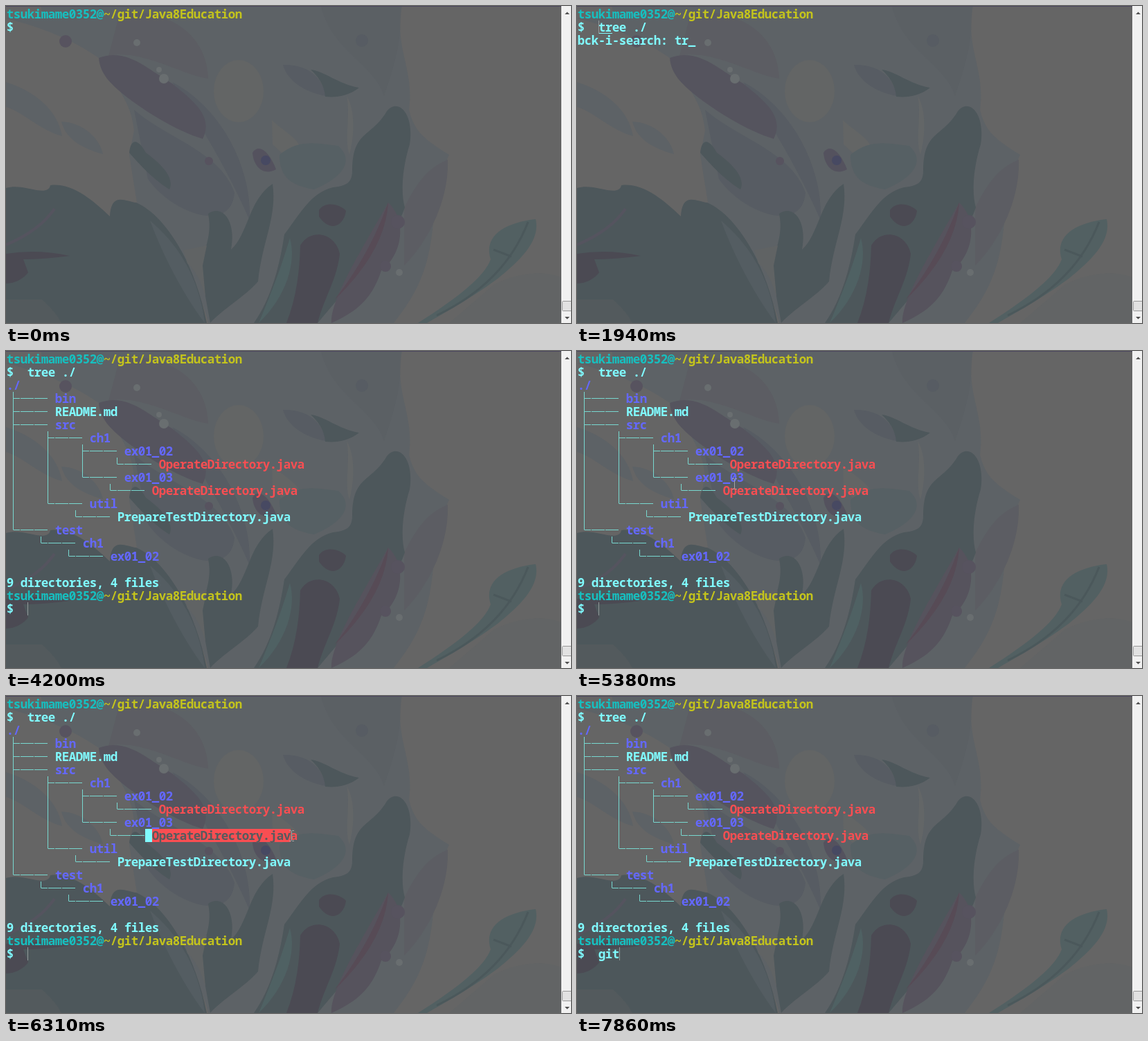
Write an HTML page that moves like this. It is 816 by 458 pixels and loops after 8 s.

```html
<!DOCTYPE html>
<html lang="en">
<head>
<meta charset="utf-8">
<title>Terminal session</title>
<style>
html, body { margin: 0; width: 100%; height: 100%; overflow: hidden; background: #656565; }
svg { display: block; width: 816px; height: 458px; }
text { font: 600 17.5px "Noto Sans Mono", "DejaVu Sans Mono", monospace; letter-spacing: -.5px; white-space: pre; }
</style>
</head>
<body>
<svg viewBox="0 0 816 458" xmlns="http://www.w3.org/2000/svg">
  <g id="wallpaper">
    <rect width="816" height="458" fill="#656565"/>
    <g fill="#5d6266">
      <path d="M0 18C50 30 100 50 138 78C150 110 180 130 185 180L178 215L190 290C230 350 280 400 292 458H560C640 360 600 300 640 215C600 190 590 180 582 150C590 90 560 60 572 0H50C60 30 20 10 0 18Z"/>
      <path d="M0 110C40 122 75 150 81 188C50 180 20 150 0 146Z"/>
      <path d="M80 167C110 168 135 190 140 214C110 206 86 192 80 167Z"/>
    </g>
    <path d="M640 458L705 402C750 380 785 385 802 392V458Z" fill="#626465"/>
    <g fill="#5c5d63">
      <path d="M165 8C235 5 290 40 292 105C250 98 195 62 148 72Z"/>
      <path d="M575 292C600 240 620 230 638 222C640 280 610 340 575 375Z"/>
    </g>
    <g fill="#575c63">
      <path d="M240 110C300 140 355 220 352 310C330 260 300 200 240 110Z"/>
      <path d="M185 150C230 190 310 210 330 270C325 330 240 300 205 250Z"/>
      <path d="M400 85C430 84 456 98 462 130C432 125 406 108 400 85Z"/>
      <path d="M455 0H570C572 60 556 98 546 130C530 82 470 65 455 0Z" opacity=".4"/>
    </g>
    <path d="M134 75C175 60 205 92 240 112C272 138 300 160 284 192C250 182 205 155 175 132C150 112 136 98 134 75Z" fill="#55545e"/>
    <ellipse cx="336" cy="123" rx="36" ry="45" fill="#636565"/>
    <path d="M384 165C400 180 420 190 425 204L398 212L385 200Z" fill="#636565"/>
    <path d="M492 130C505 150 503 190 496 215C488 190 498 160 492 130Z" fill="#636667"/>
    <g fill="#4d575b">
      <path d="M0 263C25 255 60 278 64 259C95 255 125 280 150 304C152 268 172 282 188 284C225 300 270 360 290 458H0Z"/>
      <path d="M178 212C180 192 190 190 202 212C224 228 244 248 236 265C212 250 194 230 178 212Z"/>
      <path d="M440 92C460 94 480 113 510 118C492 132 474 132 461 131C460 114 450 101 440 92Z"/>
      <path d="M283 392C278 360 300 340 292 300C312 286 333 310 325 352C350 330 350 280 385 257C392 304 370 340 364 398C345 420 310 440 295 458Z"/>
      <path d="M500 238C500 180 528 190 550 152C566 132 590 155 583 200C572 235 570 270 576 291C560 340 510 380 478 425L450 458H358C385 420 396 370 402 330C425 300 440 270 472 262C492 260 500 255 500 238Z"/>
    </g>
    <path d="M0 424H52C60 432 72 442 80 458H0Z" fill="#535a5d"/>
    <path d="M208 310C255 350 280 400 287 458C262 425 230 370 208 310Z" fill="#545d62"/>
    <path d="M256 353L290 346L284 375L288 420Q278 385 262 372Z" fill="#606364"/>
    <path d="M395 215C425 190 455 200 480 202C510 230 470 255 445 265C415 260 395 250 395 215Z" fill="#566064"/>
    <path d="M410 335C420 370 405 420 365 458C385 410 400 370 410 335Z" fill="#4f6163"/>
    <g fill="#4b4a53">
      <path d="M425 346C440 320 476 328 482 358C478 395 460 420 450 458H405C420 420 424 382 425 346Z"/>
      <path d="M452 295C462 280 485 288 491 296C488 318 468 328 452 304Z"/>
      <path d="M0 358Q45 351 92 361Q55 366 25 366L32 385Q20 400 0 401Z"/>
    </g>
    <path d="M552 284C580 310 572 360 542 382C530 420 510 440 470 458C468 425 512 355 552 284Z" fill="#56535d"/>
    <path d="M552 284Q548 354 474 425Q525 360 552 284Z" fill="#574b56"/>
    <path d="M0 345Q48 325 70 293" fill="none" stroke="#55545f" stroke-width="4"/>
    <path d="M595 458C652 422 692 390 700 366C690 335 715 314 765 308C772 338 745 366 710 394C675 420 635 442 608 458Z" fill="#526062"/>
    <path d="M622 447Q720 400 754 312M704 352L730 362" fill="none" stroke="#4b585b" stroke-width="3"/>
    <path d="M356 212C365 198 380 210 390 236C375 245 358 236 356 212Z" fill="#54525e"/>
    <circle cx="375" cy="223" r="7" fill="#474962"/>
    <g fill="#57535f">
      <circle cx="86" cy="51" r="9"/><circle cx="293" cy="224" r="6"/>
      <circle cx="566" cy="312" r="10"/><circle cx="548" cy="376" r="8"/>
    </g>
    <circle cx="514" cy="50" r="9" fill="#575c63"/>
    <g fill="#696e70">
      <circle cx="228" cy="105" r="7"/><circle cx="221" cy="92" r="4"/>
      <circle cx="189" cy="53" r="5"/><circle cx="568" cy="385" r="5"/>
    </g>
    <rect width="802" height="1" fill="#4b465e"/>
  </g>
  <g id="screen"></g>
  <g id="scrollbar">
    <rect x="802" width="14" height="458" fill="#f1f1f1"/>
    <path d="M807 12L810.5 8.5L814 12ZM807 449L810.5 452.5L814 449Z" fill="#505050"/>
    <rect x="803.5" y="426.5" width="15" height="14" rx="1" fill="#e2e2e2" stroke="#979797"/>
  </g>
</svg>
<script>
const CELL = 10, LINE = 19, LOOP = 8000;
const CYAN = '#80fbff', BLUE = '#6468ff', RED = '#f94e52';
const TEAL = '#16c0c0', YELLOW = '#c4c41c', DARK = '#565b5e';
const screen = document.getElementById('screen');
const colX = col => 1 + col * CELL;
const rowY = row => 2 + row * LINE;

function add(parent, tag, attrs, content) {
  const node = document.createElementNS('http://www.w3.org/2000/svg', tag);
  for (const key in attrs) node.setAttribute(key, attrs[key]);
  if (content) node.textContent = content;
  return parent.appendChild(node);
}
const group = () => add(screen, 'g', {});
const write = (parent, col, row, content, fill = CYAN) =>
  add(parent, 'text', { x: colX(col) - .25, y: rowY(row) + 16, fill }, content);
const show = (node, on) => node.setAttribute('visibility', on ? 'visible' : 'hidden');

function prompt(parent, row) {
  write(parent, 0, row, 'tsukimame0352@', TEAL);
  write(parent, 14, row, '~/git/Java8Education', YELLOW);
  write(parent, 0, row + 1, '$');
}

// Each entry: row, column of its branch, row its trunk starts at, label, colour.
const entries = [
  [3, 1, 3, 'bin', BLUE], [4, 1, 4, 'README.md', CYAN], [5, 1, 5, 'src', BLUE],
  [6, 6, 6, 'ch1', BLUE], [7, 11, 7, 'ex01_02', BLUE],
  [8, 16, 8, 'OperateDirectory.java', RED], [9, 11, 7, 'ex01_03', BLUE],
  [10, 15, 10, 'OperateDirectory.java', RED], [11, 6, 6, 'util', BLUE],
  [12, 10, 12, 'PrepareTestDirectory.java', CYAN], [13, 1, 3, 'test', BLUE],
  [14, 5, 14, 'ch1', BLUE], [15, 9, 15, 'ex01_02', BLUE]
];

prompt(screen, 0);
const command = write(screen, 3, 1, 'tree ./');
const search = write(screen, 0, 2, '');
const underline = add(screen, 'rect', { x: colX(3), y: 39, height: 1, fill: CYAN });

const listing = group();
write(listing, 0, 2, './', BLUE);
for (const [row, col, from, label, fill] of entries) {
  const x = colX(col), y = rowY(row) + 9.5;
  add(listing, 'path', {
    d: `M${x - .5} ${rowY(from)}V${y}M${x} ${y}h9m1 0h19m1 0h19`,
    fill: 'none', stroke: '#78d8d0'
  });
  write(listing, col + 6, row, label, fill);
}
write(listing, 0, 17, '9 directories, 4 files');
prompt(listing, 18);
const typed = write(listing, 3, 19, '');

const selection = group();
const bar = (col, fill) =>
  add(selection, 'rect', { x: colX(col), y: rowY(10), height: LINE, width: CELL, fill });
bar(20, CYAN);
const nameBar = bar(21, RED);
const tailBar = bar(42, CYAN);
const nameText = write(selection, 21, 10, '', DARK);

const caret = add(screen, 'rect', { width: 1, height: LINE, fill: '#929a9a' });
const pointer = add(screen, 'path', {
  d: 'M1 .5h2.5l1 1l1-1H8M4.5 1.5v13M1 15.5h2.5l1-1l1 1H8',
  fill: 'none', stroke: '#a4a6a6'
});

const blinks = [120, 700, 1260, 1690, 1940, 2620, 3030, 3740, 4200, 4720,
  5260, 5800, 6310, 7270, 7580];
const pointerSteps = [
  [4600, 386, 180], [4720, 259, 179], [4870], [5020, 258, 179], [5140, 249, 180],
  [5260, 236, 182], [5380, 223, 184], [5530, 215, 188], [5680, 208, 191],
  [5800, 203, 193], [5950, 215, 193], [6070, 268, 193], [6190, 345, 193],
  [6310, 408, 194], [6430]
];
const selectionSteps = [[5950, 21], [6070, 27], [6190, 35], [6310, 41], [6430, 80], [7580, 0]];
const searchSteps = [[1410, ''], [1690, 't'], [1940, 'tr'], [2190, 'tre']];
const typingSteps = [[7580, 'g'], [7730, 'gi'], [7860, 'git']];
const stepAt = (steps, t) => steps.filter(step => step[0] <= t).pop() || [];

function draw(t) {
  const listed = t >= 3180;
  const query = stepAt(searchSteps, t)[1];
  show(listing, listed);
  show(command, t >= 1690);
  show(search, !listed);
  search.textContent = query === undefined ? '' : `bck-i-search: ${query}_`;
  underline.setAttribute('width', listed ? 0 : (query || '').length * CELL);

  const input = stepAt(typingSteps, t)[1] || '';
  typed.textContent = input;
  caret.setAttribute('x', colX(3 + input.length));
  caret.setAttribute('y', rowY(listed ? 19 : 1));
  show(caret, blinks.filter(time => time <= t).length % 2);

  const end = stepAt(selectionSteps, t)[1] || 0;
  const chars = Math.max(0, Math.min(end, 42) - 21);
  show(selection, end > 0);
  nameBar.setAttribute('width', chars * CELL);
  tailBar.setAttribute('width', Math.max(0, end - 42) * CELL);
  nameText.textContent = 'OperateDirectory.java'.slice(0, chars);

  const [, x, y] = stepAt(pointerSteps, t);
  show(pointer, x !== undefined);
  if (x !== undefined) pointer.setAttribute('transform', `translate(${x} ${y})`);
}

function tick() {
  draw(performance.now() % LOOP);
  requestAnimationFrame(tick);
}
tick();
</script>
</body>
</html>
```
